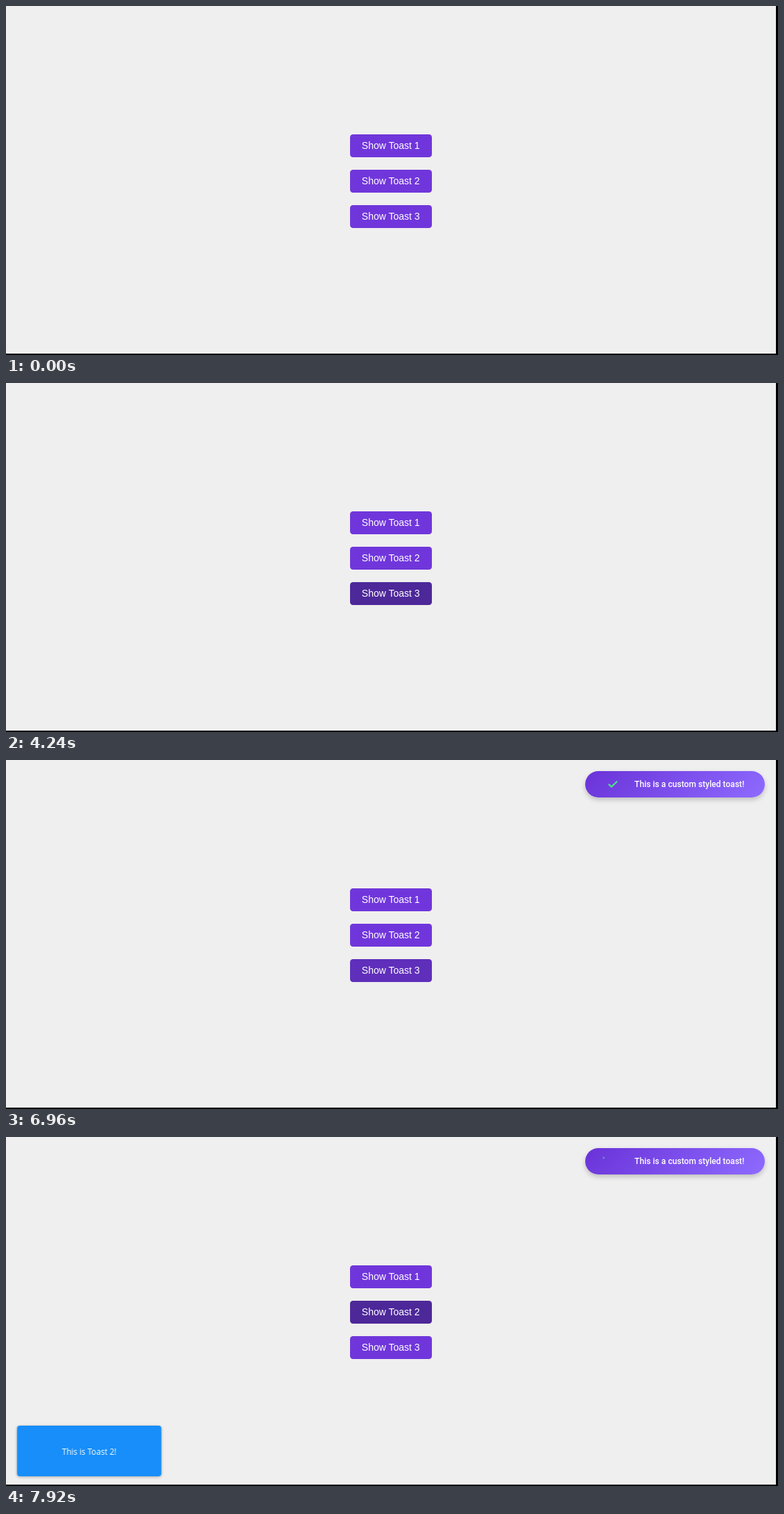
An HTML page for the animation above (8000 ms loop, 1113x503 px).

```html
<!DOCTYPE html>
<html lang="en">
<head>
<meta charset="utf-8">
<title>Toasts</title>
<style>
  html, body { margin: 0; width: 100%; height: 100%; overflow: hidden; background: #000; }
  #page { position: absolute; left: 0; top: 0; width: 1109.5px; height: 501.3px; overflow: hidden; background: #efefef; }
  .btn, .toast { position: absolute; box-sizing: border-box; color: #fff; white-space: nowrap; }
  .btn {
    left: 495.6px; width: 118.3px; height: 33.6px; border-radius: 4.3px;
    background: #7036db; text-align: center;
    font: 14px/33.6px "Liberation Sans", Arial, sans-serif;
  }
  #one {
    left: 834.8px; top: 15.6px; width: 259.2px; height: 38.2px; border-radius: 19.1px;
    padding-left: 71.3px; opacity: 0;
    background: linear-gradient(135deg, #6a32d8, #8e6bff);
    box-shadow: 0 3.5px 7px rgba(0, 0, 0, .2);
    font: 500 12.1px/38.2px Roboto, sans-serif;
  }
  #one svg { position: absolute; left: 0; top: 0; overflow: visible; }
  #two {
    left: 15.6px; top: 416.2px; width: 208.8px; height: 73px; border-radius: 4px;
    text-align: center; opacity: 0; background: #178ef9;
    box-shadow: 0 1px 4px rgba(0, 0, 0, .3);
    font: 11.7px/74px "Open Sans", "Noto Sans", sans-serif;
  }
</style>
</head>
<body>
<div id="page">
  <div class="btn" style="top:184.5px">Show Toast 1</div>
  <div class="btn" id="b2" style="top:235.5px">Show Toast 2</div>
  <div class="btn" id="b3" style="top:286.5px">Show Toast 3</div>
  <div class="toast" id="one">
    <svg width="70" height="38">
      <path id="check" d="M34.4 19.4 L38 22.6 L45.6 15.2" pathLength="1" fill="none" stroke="#4fdf8c"
        stroke-width="2.2" stroke-linecap="round" stroke-linejoin="round" stroke-dasharray="1 2" opacity="0"/>
      <circle id="trail" r=".7" fill="#48b8b0" opacity="0"/>
      <circle id="dot" r=".9" fill="#52d8a0" opacity="0"/>
    </svg>
    This is a custom styled toast!
  </div>
  <div class="toast" id="two">This is Toast 2!</div>
</div>
<script>
  const LOOP = 8000;
  const $ = id => document.getElementById(id);

  // steps: [time in ms, properties, easing towards the next step]
  function play(id, steps) {
    const first = steps[0], last = steps[steps.length - 1];
    const all = [[0, first[1]], ...steps, [LOOP, last[1]]];
    $(id).animate(
      all.map(([t, props, easing = 'linear']) => ({ offset: Math.min(t / LOOP, 1), easing, ...props })),
      { duration: LOOP, iterations: Infinity });
  }

  const base = { backgroundColor: '#7036db' }, hover = { backgroundColor: '#4d2899' };
  play('b3', [[2940, base, 'ease'], [3240, hover], [6870, hover, 'ease'], [7170, base]]);
  play('b2', [[7090, base, 'ease'], [7390, hover]]);

  const shown = { transform: 'translate(0, 0)', opacity: 1 };
  play('one', [[4365, { transform: 'translate(0, -100%)', opacity: 0 }, 'ease'], [4665, shown]]);
  play('two', [[7726, { transform: 'translate(-100%, 0)', opacity: 0 }, 'ease'], [7926, shown]]);

  // The icon: a bouncing spark that lands and draws the check mark
  const STARTS = [5120, 7600];
  const HOPS = [
    [0, 20, 25, 0], [80, 21, 23, .6], [160, 23.4, 18.8, .9], [320, 26.8, 13.8, 1],
    [560, 29.6, 19.6, .9], [800, 32.3, 14.6, 1], [940, 34.4, 19.4, 1], [980, 34.4, 19.4, 0]
  ];
  function spark(id, lag) {
    const steps = STARTS.flatMap(start => HOPS
      .map(([t, x, y, opacity], i) => [
        start + t + lag,
        { transform: `translate(${x}px, ${y}px)`, opacity },
        i === 3 || i === 5 ? 'ease-in' : i === 2 || i === 4 ? 'ease-out' : 'linear'
      ])
      .filter(step => step[0] < LOOP));
    play(id, steps);
  }
  spark('dot', 0);
  spark('trail', 60);

  const line = (strokeDashoffset, opacity) => ({ strokeDashoffset, opacity });
  play('check', [
    [6050, line(1, 0)], [6070, line(1, 1), 'ease-out'], [6520, line(0, 1)],
    [7120, line(0, 1), 'ease-in'], [7400, line(-1, 1)], [7420, line(-1, 0)]
  ]);
</script>
</body>
</html>
```
